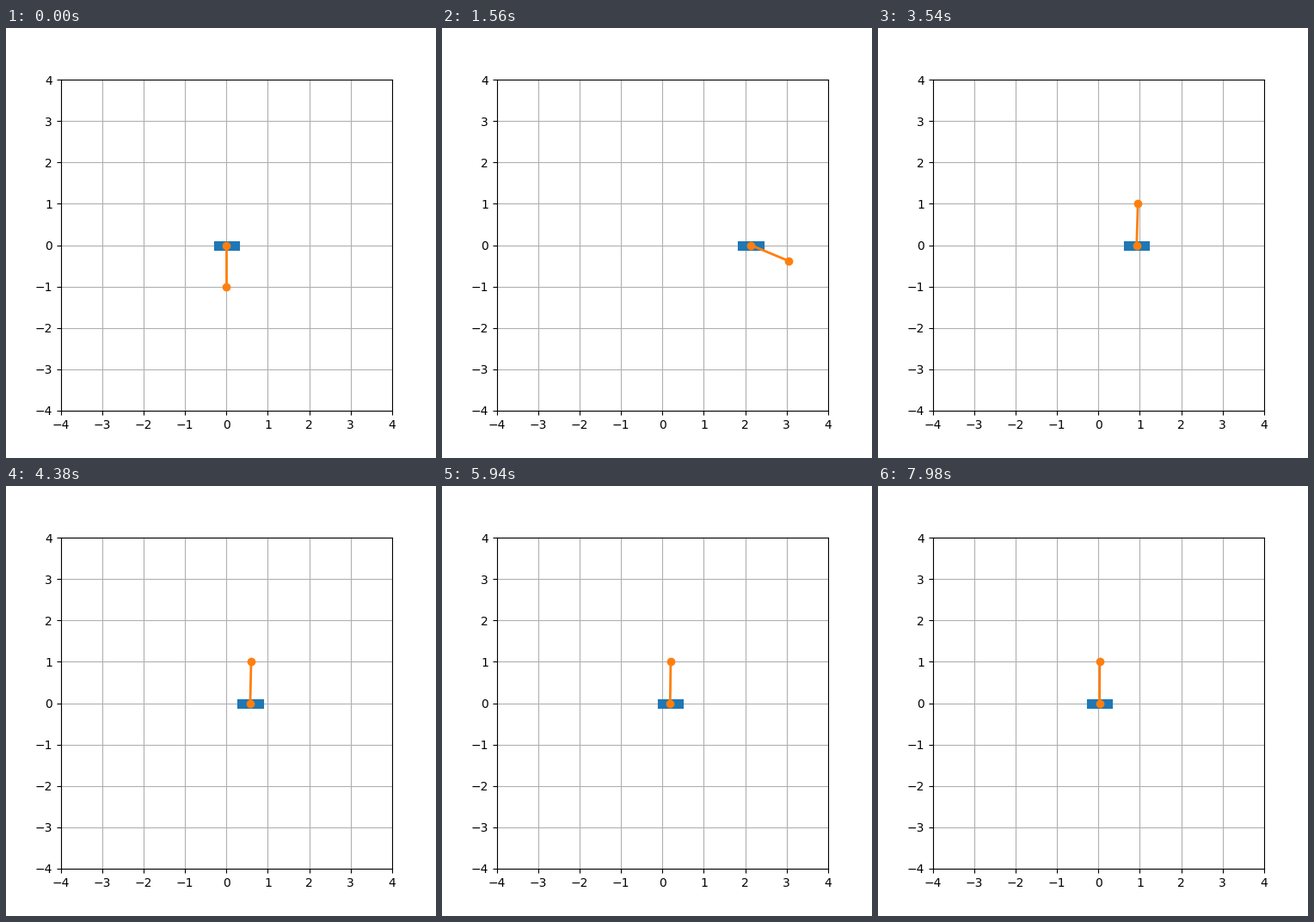
Write a matplotlib script that moves like this. It is 500x500 px and loops after 8000 ms.

```python
import numpy as np
import matplotlib.pyplot as plt
from matplotlib.animation import FuncAnimation

TICK = 20               # ms per drawn frame
LOOP = 8000             # ms per loop
HOLD = 3                # drawn frames per pose
GRAVITY = 9.8

BACK, BACK_ANGLE = 0.82, -1.6       # far end of the backswing
CATCH, CATCH_ANGLE = 1.68, 1.725    # from here the pole coasts upright
CATCH_SPEED = 4.2


def cart_x(t):
    """Quick push to the right with overshoot, then a slow glide home."""
    push = 1 - np.exp(-0.871 * t ** 2) * np.cos(1.55 * t)
    glide = 2.4935 * np.exp(-0.0652 * (t + 0.361) ** 2)
    return push * glide


def ease(t, t0, t1, a, b, end_speed=0):
    """Cubic from rest at a to b, arriving with end_speed."""
    u = (t - t0) / (t1 - t0)
    return (a + (b - a) * u * u * (3 - 2 * u)
            + end_speed * (t1 - t0) * u * u * (u - 1))


def pole_angle(t):
    """Angle from hanging straight down, positive to the right."""
    if t < BACK:
        return ease(t, 0, BACK, 0, BACK_ANGLE)
    if t < CATCH:
        return ease(t, BACK, CATCH, BACK_ANGLE, CATCH_ANGLE, CATCH_SPEED)
    dt = t - CATCH
    start = np.tan((np.pi - CATCH_ANGLE) / 4)
    coast = 4 * np.arctan(start * np.exp(-np.sqrt(GRAVITY) * dt))
    lean = 0.037 * (1 - np.exp(-4 * dt)) * np.exp(-(t / 6) ** 2)
    return np.pi - coast - lean


fig, ax = plt.subplots(figsize=(5, 5), dpi=100)
ax.set_xlim(-4, 4)
ax.set_ylim(-4, 4)
ax.set_aspect("equal")
ax.grid()

cart, = ax.plot([], [], color="C0", lw=8)
pole, = ax.plot([], [], "o-", color="C1", lw=2)


def draw(frame):
    t = frame // HOLD * HOLD * TICK / 1000
    x, angle = cart_x(t), pole_angle(t)
    cart.set_data([x - 0.2, x + 0.2], [0, 0])
    pole.set_data([x, x + np.sin(angle)], [0, -np.cos(angle)])
    return cart, pole


anim = FuncAnimation(fig, draw, frames=LOOP // TICK, interval=TICK,
                     init_func=lambda: draw(0), repeat=True, repeat_delay=0)
plt.show()
```
